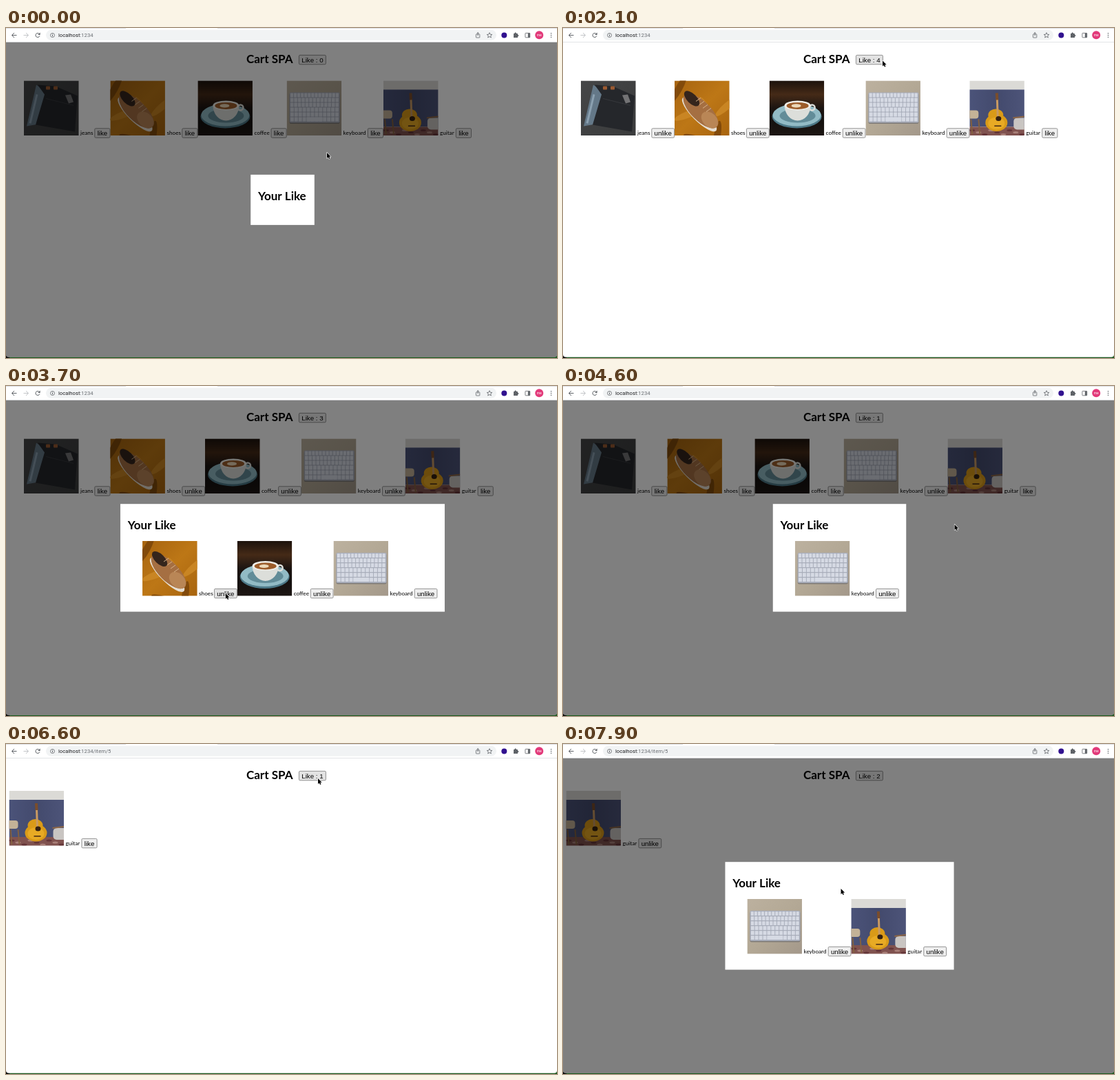
An HTML page with a canvas for the animation above (8000 ms loop, 800x479 px).

```html
<!DOCTYPE html>
<html lang="en">
<head>
<meta charset="utf-8">
<title>Cart SPA</title>
<style>
html, body { margin: 0; width: 100%; height: 100%; overflow: hidden; background: #fff; }
canvas { display: block; }
</style>
</head>
<body>
<canvas id="stage" width="800" height="479"></canvas>
<script>
const c = document.getElementById('stage').getContext('2d');
const LOOP = 8000, TICK = 100;
const UI = '"Liberation Sans", Arial, sans-serif';
const BODY = 'Lato, "Noto Sans", sans-serif';
const BAR = 'Roboto, Arial, sans-serif';
const HEADING = 'bold 17px ' + BODY;

// drawing helpers
function rect(x, y, w, h, fill) { c.fillStyle = fill; c.fillRect(x, y, w, h); }
function trace(points) {
  c.beginPath();
  for (let i = 0; i < points.length; i += 2) c.lineTo(points[i], points[i + 1]);
}
function poly(fill, ...points) {
  trace(points);
  c.fillStyle = fill;
  c.fill();
}
function line(color, width, ...points) {
  trace(points);
  c.strokeStyle = color;
  c.lineWidth = width;
  c.stroke();
}
function oval(x, y, rx, ry, fill, turn = 0) {
  c.beginPath();
  c.ellipse(x, y, rx, ry, turn, 0, 7);
  c.fillStyle = fill;
  c.fill();
}
function ring(x, y, r, color, width = 1, from = 0, to = 7) {
  c.beginPath();
  c.arc(x, y, r, from, to);
  c.strokeStyle = color;
  c.lineWidth = width;
  c.stroke();
}
function round(x, y, w, h, r, fill, stroke) {
  c.beginPath();
  c.roundRect(x, y, w, h, r);
  if (fill) { c.fillStyle = fill; c.fill(); }
  if (stroke) { c.strokeStyle = stroke; c.lineWidth = 0.8; c.stroke(); }
}
function text(s, x, y, font, color = '#000', align = 'left') {
  c.font = font;
  c.fillStyle = color;
  c.textAlign = align;
  c.fillText(s, x, y);
}
function shade(x, y, ...colors) {
  const g = c.createLinearGradient(0, 0, x, y);
  colors.forEach((k, i) => g.addColorStop(i / (colors.length - 1), k));
  return g;
}

// product pictures, each in an 80 by 80 box
function jeans() {
  rect(0, 0, 80, 80, shade(80, 80, '#454647', '#3a3b3c'));
  poly('#647888', 18, 6, 32, 16, 21, 63, 4, 66);
  line('#8ba0b0', 3, 19, 20, 9, 62);
  poly('#25272b', 20, 6, 46, 8, 78, 22, 74, 74, 17, 64, 30, 20);
  line('#36383c', 1, 32, 26, 72, 36);
  for (const x of [32, 43]) round(x, 8, 6, 5, 1, '#9a5a32');
  poly('#737375', 60, 21, 68, 20, 72, 31, 65, 33);
}
function shoes() {
  rect(0, 0, 80, 80, shade(80, 80, '#a7640f', '#bd7716', '#a8640e'));
  for (let i = 0; i < 6; i++) {
    oval(6 + i * 14, 12 + i * 37 % 80, 5, 22, i % 2 ? '#c98523' : '#824a0a', 0.5 + i * 0.7);
  }
  const tilt = 0.78;
  oval(36, 49, 34, 10, '#e6ded1', tilt);
  oval(38, 44, 33, 14, '#a56f42', tilt);
  oval(51, 57, 14, 10, '#b98656', tilt);
  oval(25, 26, 14, 7, '#35251c', tilt);
  for (let i = 0; i < 4; i++) line('#d8b48a', 1, 31 + i * 5, 30 + i * 5, 38 + i * 5, 25 + i * 5);
}
function coffee() {
  rect(0, 0, 80, 80, shade(0, 80, '#1c120c', '#452a17', '#1b1411', '#15110f', '#1d1613'));
  oval(40, 52, 36, 17, '#4d7988');
  oval(40, 50, 35, 16, '#92bbc5');
  oval(41, 51, 26, 10, '#628c98');
  ring(62, 39, 4, '#dcdeda', 2.5);
  c.save();
  c.beginPath();
  c.rect(20, 36, 44, 30);
  c.clip();
  oval(41, 36, 19, 22, '#dcdeda');
  c.restore();
  oval(41, 36, 19, 7, '#f0efe9');
  oval(41, 36.5, 16, 5, '#9c5c2a');
  oval(39, 36.5, 7, 2.6, '#ecd8b8');
}
function keyboard() {
  rect(0, 0, 80, 80, shade(80, 80, '#bcb19f', '#b3a895', '#a3988a'));
  round(4, 18.5, 73, 44, 2, '#7d7975');
  round(4, 17, 73, 44, 2, '#a9aebb');
  for (let row = 0; row < 6; row++) {
    const n = 14 - (row > 0) - (row > 2), step = 71 / n;
    for (let i = 0; i < n; i++) round(5.3 + i * step, 18.2 + row * 7, step - 1, 5.8, 0.6, '#d6dae4');
  }
  round(29, 53.2, 23, 5.8, 0.6, '#d6dae4');
}
function guitar() {
  rect(0, 0, 80, 13, '#dbdad6');
  rect(0, 13, 80, 54, shade(80, 0, '#4b5379', '#434a6d', '#4d5479'));
  rect(0, 67, 80, 13, '#80524f');
  for (let i = 0; i < 9; i++) oval(4 + i * 9, 72 + i % 3 * 3, 4, 1.5, i % 2 ? '#a98079' : '#643538');
  for (const x of [2, 13]) line('#83603f', 2, x, 56, x + 2, 78);
  round(-4, 43, 17, 12, 4, '#c3b297');
  round(64, 54, 20, 17, 5, '#c9c5c2');
  line('#8f6745', 2, 63, 54, 80, 52);
  oval(38, 50, 11, 9, '#d99a18');
  oval(39, 61, 16, 12.5, '#d99a18');
  oval(39, 62, 12, 9, '#e8aa24');
  line('#c99a62', 3, 40, 26, 41, 54);
  line('#7a4d2b', 4, 39.5, 18, 40, 28);
  oval(42, 55, 4, 3.5, '#35210f');
  rect(36, 65, 10, 1.6, '#4d2f14');
}

// buttonAt is the distance from a picture to its button
const items = [
  { name: 'jeans', art: jeans, buttonAt: 102.4 },
  { name: 'shoes', art: shoes, buttonAt: 104 },
  { name: 'coffee', art: coffee, buttonAt: 106.2 },
  { name: 'keyboard', art: keyboard, buttonAt: 117.3 },
  { name: 'guitar', art: guitar, buttonAt: 105 }
];
const [JEANS, SHOES, COFFEE, KEYBOARD, GUITAR] = items;

// layout
const buttonWidth = on => on ? 33.6 : 23;

function placeRow(list, x, y, liked) {
  return list.map(item => {
    const on = liked.has(item);
    const cell = { item, on, x, y, bx: x + item.buttonAt, by: y + 69, bw: buttonWidth(on) };
    x = cell.bx + cell.bw;
    return cell;
  });
}
function placePage({ page, liked }) {
  return page ? placeRow([page], 4.5, 68, liked) : placeRow(items, 26, 76.4, liked);
}
function placeModal({ liked }) {
  const list = items.filter(i => liked.has(i));
  const w = list.reduce((sum, i) => sum + i.buttonAt + buttonWidth(true), list.length ? 42.6 : 92.6);
  const h = list.length ? 156.4 : 73;
  const x = 401.5 - w / 2, y = 249.4 - h / 2;
  return { x, y, w, h, cells: placeRow(list, x + 32, y + 53.8, liked) };
}

// The pointer reaches each step's place one tick early, then the step happens.
const script = [
  [0, 'rest', [466, 181]], [400, 'close', [466, 181]],
  [1000, 'toggle', JEANS], [1200, 'toggle', SHOES], [1500, 'toggle', COFFEE], [1800, 'toggle', KEYBOARD],
  [2200, 'open', [464, 47.5]], [2900, 'rest', [501.5, 160]],
  [3200, 'toggle', JEANS], [3800, 'toggle', SHOES], [4200, 'toggle', COFFEE],
  [4700, 'rest', [568.5, 201]], [4900, 'close', [568.5, 201]],
  [5700, 'visit', GUITAR], [6200, 'rest', [560, 110]],
  [6700, 'open', [453, 50]], [7000, 'close', [436.5, 133]],
  [7400, 'toggle', GUITAR], [7700, 'open', [450, 47]], [8000, 'rest', [403.5, 210]]
];

function locate(state, action, target) {
  if (Array.isArray(target)) return target;
  const cells = state.modal ? placeModal(state).cells : placePage(state);
  const cell = cells.find(k => k.item === target);
  return action === 'visit' ? [cell.x + 40, cell.y + 50] : [cell.bx + cell.bw / 2, cell.by + 7];
}
function replay() {
  let state = { liked: new Set(), modal: true, page: null };
  return script.map(([at, action, target]) => {
    const mouse = locate(state, action, target);
    state = { ...state, at, mouse, liked: new Set(state.liked) };
    if (action === 'open') state.modal = true;
    if (action === 'close') state.modal = false;
    if (action === 'visit') state.page = target;
    if (action === 'toggle' && !state.liked.delete(target)) state.liked.add(target);
    return state;
  });
}
const states = replay();

function sceneAt(t) {
  const next = states.findIndex(s => s.at > t);
  const a = states[next - 1], b = states[next];
  const u = Math.min(1, (t - a.at) / (b.at - TICK - a.at || 1));
  const k = u * u * (3 - 2 * u);
  return { ...a, mouse: a.mouse.map((v, i) => v + (b.mouse[i] - v) * k) };
}

// page parts
function button(label, x, y, w, mouse) {
  const over = mouse && Math.abs(mouse[0] - x - w / 2) < w / 2 && Math.abs(mouse[1] - y - 7) < 7;
  round(x + 0.4, y + 0.4, w - 0.8, 13.4, 1.5, over ? '#e3e3e3' : '#efefef', '#7c7c7c');
  text(label, x + w / 2, y + 10.5, '9.7px ' + UI, '#000', 'center');
}
function drawCell({ item, on, x, y, bx, by, bw }, mouse) {
  c.save();
  c.translate(x, y);
  c.beginPath();
  c.rect(0, 0, 79.5, 79.5);
  c.clip();
  item.art();
  c.restore();
  text(item.name, x + 82, y + 79, '8.2px ' + BODY);
  button(on ? 'unlike' : 'like', bx, by, bw, mouse);
}
function drawModal(scene) {
  const { x, y, w, h, cells } = placeModal(scene);
  rect(x, y, w, h, '#fff');
  text('Your Like', x + 10.7, y + 37, HEADING);
  cells.forEach(k => drawCell(k, scene.mouse));
}

function arrow(x, dir, color) {
  line(color, 1, x - 3.5 * dir, 10.5, x + 3.5 * dir, 10.5);
  line(color, 1, x, 7, x + 3.5 * dir, 10.5, x, 14);
}
function drawToolbar(page) {
  const ink = '#5f6368';
  rect(0, 0, 800, 20, '#fff');
  rect(0, 0, 174, 0.8, '#d5d8dc');
  rect(307, 0, 493, 0.8, '#d5d8dc');
  rect(0, 20, 800, 0.8, '#dcdee1');
  round(58, 2.8, 654, 15, 7.5, '#f1f3f4');
  arrow(12, -1, ink);
  arrow(29, 1, '#c3c5c8');
  ring(46, 10.5, 3, ink, 1, 0.3, 5.5);
  poly(ink, 49.6, 6.6, 49.6, 10, 46.2, 10);
  ring(67.5, 10.5, 3, ink, 0.8);
  rect(67, 10, 1, 2.2, ink);
  rect(67, 8.5, 1, 0.9, ink);
  const font = '7.7px ' + BAR;
  text('localhost', 76, 13.2, font, '#202124');
  text(':1234' + (page ? '/item/5' : ''), 76 + c.measureText('localhost').width, 13.2, font, '#6a6e73');

  round(682.4, 9, 5.4, 5, 0.5, null, ink);
  line(ink, 0.8, 685.1, 11.5, 685.1, 6.5);
  line(ink, 0.8, 683.4, 8.2, 685.1, 6.5, 686.8, 8.2);
  const star = [];
  for (let i = 0; i <= 10; i++) {
    const a = i * Math.PI / 5, r = i % 2 ? 1.8 : 4;
    star.push(702 + r * Math.sin(a), 10.7 - r * Math.cos(a));
  }
  line(ink, 0.8, ...star);
  oval(723.3, 10.5, 4, 4, '#31118f');
  round(737, 8, 6, 6, 0.6, ink);
  oval(739.7, 7.8, 1.3, 1.3, ink);
  oval(743, 11, 1.3, 1.3, ink);
  round(753.9, 7.4, 6.8, 6.4, 0.6, null, ink);
  rect(757.8, 7.4, 2.9, 6.4, ink);
  oval(774.2, 10.3, 6, 6, '#e23a7a');
  text('me', 774.2, 12.1, '5px ' + BAR, '#fff', 'center');
  for (let i = -1; i < 2; i++) oval(791.5, 10.5 + i * 2.8, 0.8, 0.8, ink);
}
function drawPointer([x, y]) {
  c.save();
  c.translate(x, y);
  c.lineJoin = 'round';
  trace([0, 0, 0, 8, 1.8, 6.4, 3, 9, 4.4, 8.4, 3.2, 5.8, 5.6, 5.8]);
  c.closePath();
  c.strokeStyle = '#fff';
  c.lineWidth = 1.2;
  c.stroke();
  c.fillStyle = '#000';
  c.fill();
  c.restore();
}

function draw(t) {
  const scene = sceneAt(t), { liked, modal, page, mouse } = scene;
  const pageMouse = modal ? null : mouse;
  rect(0, 470, 800, 9, '#1a561d');
  rect(0, 470, 5, 9, '#000');
  c.save();
  c.beginPath();
  c.roundRect(0, 0, 800, 477.7, [0, 0, 4, 4]);
  c.clip();
  rect(0, 0, 800, 479, '#fff');
  text('Cart SPA', 349, 51, HEADING);
  button('Like : ' + liked.size, 425, 39, 39.8, pageMouse);
  placePage(scene).forEach(k => drawCell(k, pageMouse));
  if (modal) {
    rect(0, 20, 800, 459, 'rgba(0,0,0,.5)');
    drawModal(scene);
  }
  drawToolbar(page);
  c.restore();
  drawPointer(mouse);
}

function frame() {
  const t = performance.now() % LOOP;
  draw(Math.floor(t / TICK) * TICK);
  requestAnimationFrame(frame);
}
frame();
</script>
</body>
</html>
```
